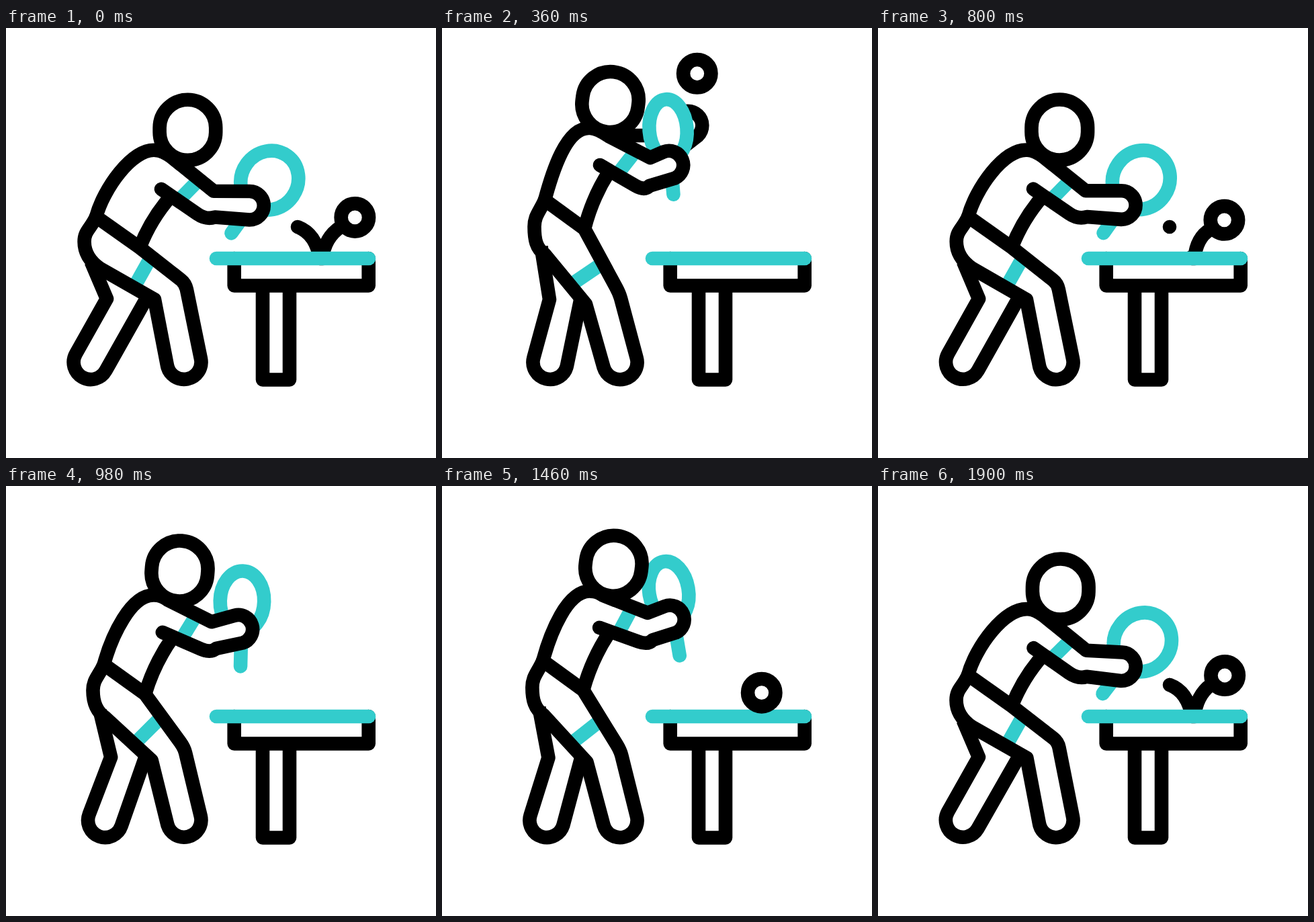
These frames come from a looping animation (640 by 640 pixels, 1920 ms). An HTML page:

```html
<!DOCTYPE html>
<html lang="en">
<head>
<meta charset="utf-8">
<title>Table tennis</title>
<style>
  html, body { margin: 0; width: 100%; height: 100%; overflow: hidden; background: #fff; }
  svg { display: block; width: 100%; height: 100%; }
  .line { fill: none; stroke: #000; stroke-width: 20.6; stroke-linejoin: round; }
  .round { stroke-linecap: round; }
  .solid { fill: #fff; }
  .teal { stroke: #33cccc; }
  .mask { fill: #fff; stroke: none; }
</style>
</head>
<body>
<svg id="stage" viewBox="0 0 640 640"></svg>
<script>
const LOOP = 1920;
const FOOT_R = 25.5, HAND_R = 21.3, FOOT_Y = 497.5;
const stage = document.getElementById('stage');

function add(tag, classes, attrs = {}) {
  const node = document.createElementNS('http://www.w3.org/2000/svg', tag);
  node.setAttribute('class', classes);
  set(node, attrs);
  return stage.appendChild(node);
}
function set(node, attrs) {
  for (const key in attrs) node.setAttribute(key, attrs[key]);
}

const clamp = v => Math.max(0, Math.min(1, v));
const mix = (a, b, k) => a + (b - a) * k;
const mixAll = (a, b, k) => a.map((v, i) => mix(v, b[i], k));
const ramp = (t, from, to) => clamp((t - from) / (to - from));
const ease = {
  in: k => k * k,
  out: k => Math.sin(k * Math.PI / 2),
  both: k => (1 - Math.cos(k * Math.PI)) / 2,
  linear: k => k
};

// Painting order, back to front
const backLeg = add('path', 'line solid');
const hem = add('path', 'line teal');
const frontLeg = add('path', 'line');
const farArm = add('path', 'line round solid');
const racketHead = add('ellipse', 'line teal solid');
const handle = add('path', 'line round teal');
const head = add('rect', 'line solid', { x: -41.8, y: -45, width: 83.6, height: 90, rx: 41.8 });
const torsoMask = add('path', 'mask');
const strap = add('path', 'line teal');
const chest = add('path', 'line');
const torso = add('path', 'line round');
add('path', 'line round', { d: 'M339.7 343V383.5H539.7V343M382 383.5V523.5H422V383.5' });
const trail = add('path', 'line round', { pathLength: 100 });
add('path', 'line round teal', { d: 'M313 343H540' });
const ball = add('circle', 'line solid', { r: 20.7 });

// Upper body: head x y tilt | racket x y tilt radius | nape, neck, inner elbow, hand, outer elbow, shoulder
const upper = {
  rest: [270.5, 152, 0, 392.5, 227, 36, 42, 222, 182, 246, 192, 309, 243, 362.5, 264.5, 298, 286, 231, 240],
  toss: [250.5, 110, 7, 336.5, 151, -4.7, 28, 220, 149, 248, 161, 310, 193, 338, 204, 301.5, 242.5, 235, 204],
  ready: [251, 110.7, 7, 326, 137, -20, 27, 220, 150.5, 238, 156, 304, 177, 335.5, 181.5, 309, 226, 234, 204],
  hit: [280, 164, 4, 402.5, 268, 49, 42, 229, 191, 250, 202, 317, 256, 360.5, 296.5, 295, 297.6, 235, 249]
};
// Lower body: waist, seat, thigh, belly, knee, knee hollow, back knee | back foot x, hem position
const lower = {
  rest: [134, 281, 116.5, 318, 140, 358, 199, 327, 267, 380, 221, 404, 150, 403, 126, 0.25],
  up: [153, 256, 137.5, 295.5, 153, 337, 212, 299, 264, 395, 214, 411, 160, 404, 161, 0.53],
  hit: [134, 284, 116.5, 323, 140, 362, 200, 331, 273, 385, 224, 410, 149.5, 407, 127.5, 0.27]
};
const raisedArm = [262, 160, 325, 160, 366, 145, 345, 195, 300, 190];

// time, upper pose, lower pose, easing towards it
const poses = [
  [0, 'rest', 'rest', 'linear'],
  [370, 'toss', 'up', 'out'],
  [385, 'toss', 'up', 'linear'],
  [545, 'hit', 'hit', 'both'],
  [798, 'rest', 'rest', 'in'],
  [1230, 'ready', 'up', 'out'],
  [1400, 'ready', 'up', 'linear'],
  [1640, 'hit', 'hit', 'both'],
  [LOOP, 'rest', 'rest', 'in']
];

// time, x, y, vertical easing
const flights = [
  [[190, 378, 160], [385, 380, 66, 'out'], [540, 428, 268, 'in'], [680, 470, 306, 'in'],
   [800, 515, 286, 'out'], [900, 559, 272, 'linear']],
  [[1290, 574, 236], [1460, 476, 308, 'in'], [1640, 431, 270, 'out'], [1765, 470, 306, 'in'],
   [1900, 516, 282, 'out'], [1920, 519, 282, 'linear'], [2060, 567, 268, 'linear']]
];

function segment(keys, t) {
  let i = 1;
  while (i < keys.length - 1 && t > keys[i][0]) i++;
  return [keys[i - 1], keys[i], ramp(t, keys[i - 1][0], keys[i][0])];
}

const points = list => {
  const out = [];
  for (let i = 0; i + 1 < list.length; i += 2) out.push([list[i], list[i + 1]]);
  return out;
};
const at = p => p[0].toFixed(2) + ' ' + p[1].toFixed(2);
const along = (a, b, k) => mixAll(a, b, k);
const shift = (p, x, y) => [p[0] + x, p[1] + y];
const line = (a, b) => `M${at(a)}L${at(b)}`;

// Lines from p and to q, joined clockwise around a circle
function cap(p, centre, r, q) {
  const tangent = (pt, side) => {
    const dx = pt[0] - centre[0], dy = pt[1] - centre[1];
    return Math.atan2(dy, dx) + side * Math.acos(Math.min(1, r / Math.hypot(dx, dy)));
  };
  const a = tangent(p, 1), b = tangent(q, -1);
  const spot = n => at([centre[0] + r * Math.cos(n), centre[1] + r * Math.sin(n)]);
  const turn = ((b - a) % (2 * Math.PI) + 2 * Math.PI) % (2 * Math.PI);
  return `L${at(p)}L${spot(a)}A${r} ${r} 0 ${turn > Math.PI ? 1 : 0} 1 ${spot(b)}`;
}

function armPath([neck, inner, hand, outer, shoulder]) {
  const before = along(outer, hand, 0.2), after = along(outer, shoulder, 0.2);
  return `L${at(neck)}` + cap(inner, hand, HAND_R, outer) +
    `L${at(before)}Q${at(outer)} ${at(after)}L${at(shoulder)}`;
}

function drawLegs(pose) {
  const [waist, seat, thigh, belly, knee, hollow, backKnee, [footX, hemPos]] = points(pose);
  const crotch = along(hollow, thigh, 0.12);
  set(backLeg, {
    d: `M${at(crotch)}` + cap(crotch, [footX, FOOT_Y], FOOT_R, backKnee) +
      `L${at(backKnee)}L${at(shift(seat, 10, 30))}`
  });
  const bend = along(knee, belly, 0.1);
  const shin = along(knee, [290, 491], 0.08);
  set(frontLeg, {
    d: `M${at(waist)}L${at(belly)}L${at(bend)}Q${at(knee)} ${at(shin)}` +
      cap(shin, [265, FOOT_Y], FOOT_R, hollow) + `L${at(hollow)}L${at(thigh)}` +
      `C${at(shift(thigh, -13, -9))} ${at(shift(seat, 0, 19))} ${at(seat)}` +
      `C${at(shift(seat, 0, -16))} ${at(shift(waist, -8, 18))} ${at(waist)}Z`
  });
  set(hem, { d: line(along(thigh, hollow, 0.62), along(belly, knee, hemPos)) });
  return [waist, belly];
}

function drawUpper(pose, waist, belly, lift) {
  const [hx, hy, tilt, rx, ry, angle, radius] = pose;
  const [nape, ...arm] = points(pose.slice(7));
  const [neck, inner, , outer, shoulder] = arm;

  set(head, { transform: `translate(${hx} ${hy}) rotate(${tilt})` });
  const turn = `translate(${rx} ${ry}) rotate(${angle})`;
  set(racketHead, { rx: radius, ry: 45, transform: turn });
  set(handle, { d: 'M0 46V97', transform: turn });

  const d = `M${at(waist)}C${at(shift(waist, 11, -41))} ${at(shift(nape, -35, -2))} ${at(nape)}` +
    `Q${at(shift(nape, 10, 0))} ${at(neck)}` + armPath(arm);
  set(torso, { d });
  set(torsoMask, { d });
  set(strap, { d: line(along(shoulder, outer, 0.38), along(neck, inner, 0.66)) });
  const ribs = along(shoulder, outer, 0.22);
  set(chest, { d: `M${at(belly)}Q${at(shift(along(belly, ribs, 0.5), -7, -4))} ${at(ribs)}` });

  const far = points(mixAll(arm.flat(), raisedArm, lift));
  set(farArm, { d: `M${at(far[0])}` + armPath(far), visibility: lift > 0 ? 'visible' : 'hidden' });
}

function drawBall(t) {
  const time = t < 150 ? t + LOOP : t;
  const flight = flights[time < 1100 ? 0 : 1];
  const [a, b, k] = segment(flight, time);
  const x = mix(a[1], b[1], k);
  const y = mix(a[2], b[2], ease[b[3]](k));
  const first = flight[0][0], last = flight[flight.length - 1][0];
  set(ball, { cx: x, cy: y, opacity: Math.min(ramp(time, first, first + 30), ramp(time, last, last - 40)) });

  const early = time < 1100;
  const end = early
    ? 50 * ramp(time, 600, 690) + 50 * ramp(time, 690, 780)
    : 50 * ramp(time, 1700, 1775) + 50 * ramp(time, 1775, 1870);
  const start = early ? 100 * ramp(time, 710, 890) : 100 * ramp(time, LOOP, LOOP + 130);
  const tip = x > 505 ? [x - 21, y + 14] : [494, 298];
  set(trail, {
    d: `M434 296Q461 306 467 343L471 343Q474 312 ${at(tip)}`,
    'stroke-dasharray': `0 ${start} ${Math.max(0, end - start)} 300`,
    visibility: end > start ? 'visible' : 'hidden'
  });
}

function render(t) {
  const [a, b, k] = segment(poses, t);
  const p = ease[b[3]](k);
  const [waist, belly] = drawLegs(mixAll(lower[a[2]], lower[b[2]], p));
  const lift = ease.both(ramp(t, 50, 310)) * (1 - ease.both(ramp(t, 390, 530)));
  drawUpper(mixAll(upper[a[1]], upper[b[1]], p), waist, belly, lift);
  drawBall(t);
}

const begin = performance.now();
function tick() {
  render((performance.now() - begin) % LOOP);
  requestAnimationFrame(tick);
}
tick();
</script>
</body>
</html>
```
